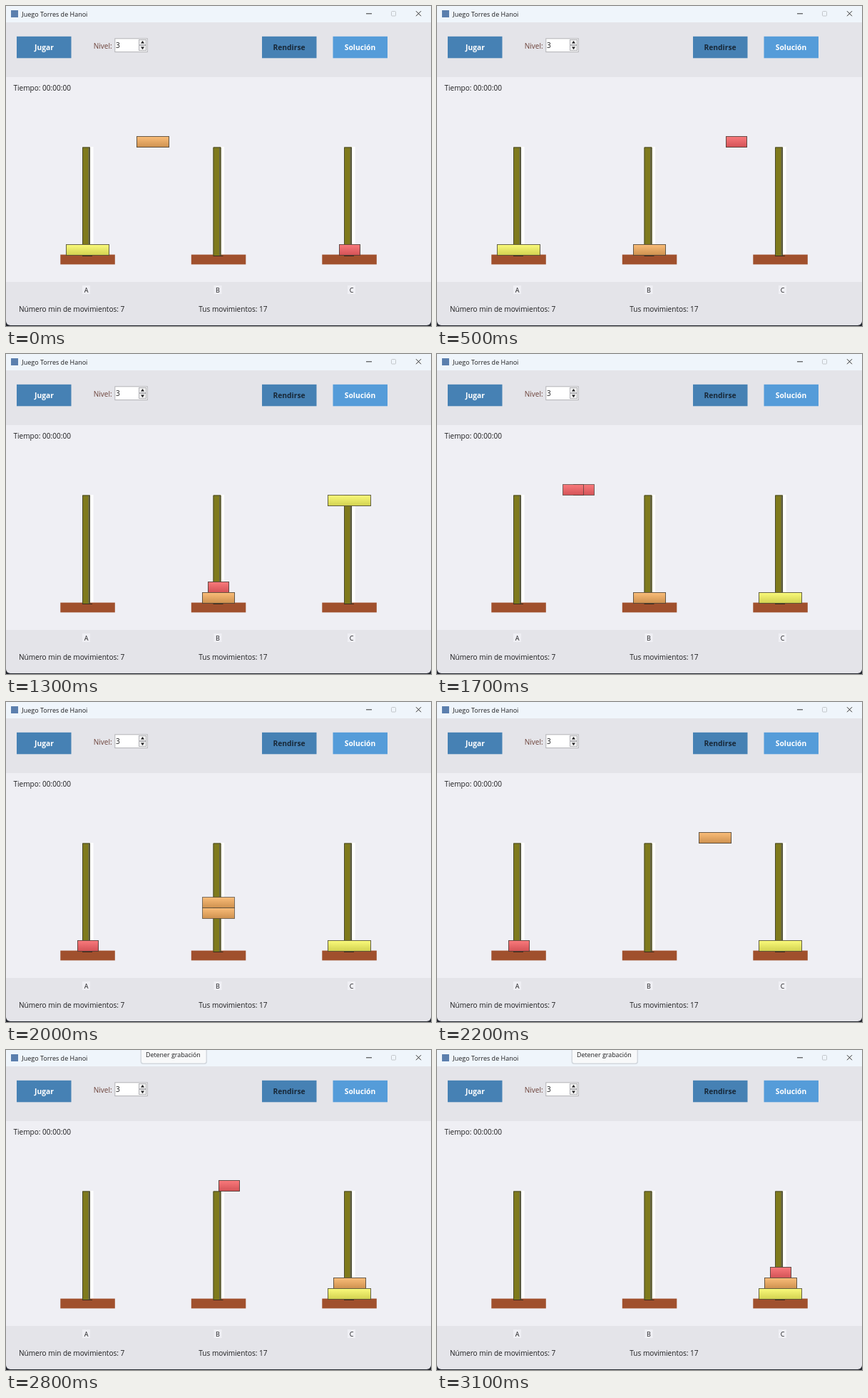
Animation, 596 px wide and 450 px high, one loop 3.2 s. Source, as an HTML page:

```html
<!DOCTYPE html>
<html lang="es">
<head>
<meta charset="utf-8">
<title>Juego Torres de Hanoi</title>
<style>
  html, body { margin: 0; width: 100%; height: 100%; overflow: hidden; background: #23262e; }
  svg { display: block; font: 10.05px "Open Sans", "Noto Sans", sans-serif; fill: #1c1c1e; }
  .bold { font-weight: 700; font-size: 10.3px; text-anchor: middle; }
  .peg-name { font-size: 9px; text-anchor: middle; }
</style>
</head>
<body>
<svg width="596" height="450" viewBox="0 0 596 450">
  <defs>
    <linearGradient id="red" x2="0" y2="1"><stop stop-color="#f97a7c"/><stop offset="1" stop-color="#d35256"/></linearGradient>
    <linearGradient id="orange" x2="0" y2="1"><stop stop-color="#fabd79"/><stop offset="1" stop-color="#ce914f"/></linearGradient>
    <linearGradient id="yellow" x2="0" y2="1"><stop stop-color="#fafa7b"/><stop offset="1" stop-color="#d2d250"/></linearGradient>
    <clipPath id="window"><rect y="-10" width="596" height="459" rx="6"/></clipPath>
    <g id="tower">
      <rect x="118" y="198" width="4.5" height="151.5" fill="#fff"/>
      <rect x="76.3" y="349.6" width="76.5" height="13.8" fill="#a0502d"/>
      <rect x="107" y="198.5" width="11" height="153" fill="#7f7a1c"/>
      <rect x="115.5" y="199" width="1.5" height="152" fill="#66664c"/>
      <path d="M107.5 351V199H117.5V351" fill="none" stroke="#4a4a2c"/>
      <path d="M107 351.5H121" stroke="#3a2a1c"/>
    </g>
  </defs>

  <g clip-path="url(#window)">
    <rect width="596" height="450" fill="#e4e4e9"/>
    <rect width="596" height="23" fill="#eff5fb"/>
    <rect y="100" width="596" height="288" fill="#efeff4"/>
  </g>

  <rect x="7" y="6" width="10" height="10" fill="#5b7fae"/>
  <text x="22.3" y="14.5" font-size="9">Juego Torres de Hanoi</text>
  <g fill="none" stroke="#333">
    <path d="M505 10.8H513M575 7.2L582 14.2M582 7.2L575 14.2"/>
    <rect x="540.5" y="7.5" width="6" height="6.5" rx="1" stroke="#c3c7cb"/>
  </g>

  <rect x="15" y="42.8" width="76.5" height="30.5" fill="#4681b4"/>
  <rect x="359" y="42.8" width="76.5" height="30.5" fill="#4681b4"/>
  <rect x="458.5" y="42.8" width="76.5" height="30.5" fill="#559cd9"/>
  <text class="bold" x="53.5" y="62" fill="#fff">Jugar</text>
  <text class="bold" x="397" y="62" fill="#182838">Rendirse</text>
  <text class="bold" x="496.5" y="62" fill="#fff">Solución</text>

  <text x="122.7" y="59.5" fill="#6b4038">Nivel:</text>
  <rect x="152.8" y="45.8" width="45.5" height="18.8" fill="#fff" stroke="#b2b2b6"/>
  <text x="154" y="58.5">3</text>
  <g fill="#f0f0f0" stroke="#b4b4b8">
    <rect x="186.5" y="47.5" width="10" height="7"/>
    <rect x="186.5" y="55.5" width="10" height="7"/>
  </g>
  <path d="M189 52.5L191.5 49L194 52.5ZM189 57.5L191.5 61L194 57.5Z"/>

  <text x="10.5" y="118.5">Tiempo: 00:00:00</text>
  <use href="#tower"/>
  <use href="#tower" x="183.5"/>
  <use href="#tower" x="367"/>
  <path d="M107 393h11v12h-11zM291.5 393h11v12h-11zM479 393h11v12h-11z" fill="#efeff4"/>
  <text class="peg-name" x="112.5" y="402.5">A</text>
  <text class="peg-name" x="297" y="402.5">B</text>
  <text class="peg-name" x="484.5" y="402.5">C</text>
  <text x="18" y="430">Número min de movimientos: 7</text>
  <text x="270.3" y="430">Tus movimientos: 17</text>

  <g id="discs" stroke="#3c3830" stroke-opacity=".65"></g>

  <g id="tip">
    <rect x="188.5" y="-6" width="93.5" height="26" rx="4" fill="#d3d8de"/>
    <rect x="190" y="-6" width="90.5" height="24.5" rx="3" fill="#f8f9fa"/>
    <text x="196" y="10" font-size="8.9">Detener grabación</text>
  </g>
</svg>
<script>
const LOOP = 3200, FRAME = 100, TIP_START = 2800;
const PEG_GAP = 183.5, STEP_X = PEG_GAP / 12, STEP_Y = 15.25;

const discs = [
  { color: 'red', width: 30, peg: 2, level: 0 },
  { color: 'orange', width: 46, peg: 0, level: 1 },
  { color: 'yellow', width: 61, peg: 0, level: 0 }
];
// disc, from peg, from level, to peg, to level
const moves = [
  [1, 0, 1, 1, 0], [0, 2, 0, 1, 1], [2, 0, 0, 2, 0],
  [0, 1, 1, 0, 0], [1, 1, 0, 2, 1], [0, 0, 0, 2, 2]
];
// [time, animation steps done]; a half step shows two positions at once
const pace = [[0, 15], [500, 45], [1000, 78], [1700, 121.5],
  [2200, 153], [2500, 171.5], [3000, 204], [3100, 210]];

const layer = document.getElementById('discs');
const tip = document.getElementById('tip');

for (const disc of discs) {
  disc.rects = [0, 1].map(() => {
    const rect = document.createElementNS('http://www.w3.org/2000/svg', 'rect');
    rect.setAttribute('width', disc.width - 1);
    rect.setAttribute('height', 15);
    rect.setAttribute('fill', `url(#${disc.color})`);
    return layer.appendChild(rect);
  });
}

function stepsAt(time) {
  const next = pace.findIndex(([t]) => t > time);
  if (next < 0) return pace.at(-1)[1];
  const [t0, s0] = pace[next - 1], [t1, s1] = pace[next];
  return s0 + (s1 - s0) * (time - t0) / (t1 - t0);
}

const pegX = peg => 114.5 + PEG_GAP * peg;
const levelY = level => 336 - STEP_Y * level;

function positionsAt(steps) {
  const places = discs.map(d => [pegX(d.peg), levelY(d.level)]);
  for (const [disc, from, low, to, high] of moves) {
    if (steps <= 0) break;
    const up = 10 - low, across = 12 * Math.abs(to - from), down = 10 - high;
    const part = (start, length) => Math.max(0, Math.min(length, steps - start));
    places[disc] = [
      pegX(from) + Math.sign(to - from) * STEP_X * part(up, across),
      levelY(low) - STEP_Y * part(0, up) + STEP_Y * part(up + across, down)
    ];
    steps -= up + across + down;
  }
  return places;
}

function place(index, places) {
  discs.forEach((disc, i) => {
    const [x, y] = places[i];
    disc.rects[index].setAttribute('x', Math.round(x - disc.width / 2) + 0.5);
    disc.rects[index].setAttribute('y', Math.round(y) - 0.5);
  });
}

function draw(now) {
  const time = Math.floor(now % LOOP / FRAME) * FRAME;
  const steps = stepsAt(time);
  const blended = Math.abs(steps % 1 - 0.5) < 0.1;
  place(0, positionsAt(blended ? Math.floor(steps) : Math.round(steps)));
  place(1, positionsAt(blended ? Math.ceil(steps) : Math.round(steps)));
  tip.style.display = time >= TIP_START ? '' : 'none';
}

const start = performance.now();
function tick() {
  draw(performance.now() - start);
  requestAnimationFrame(tick);
}
tick();
</script>
</body>
</html>
```
